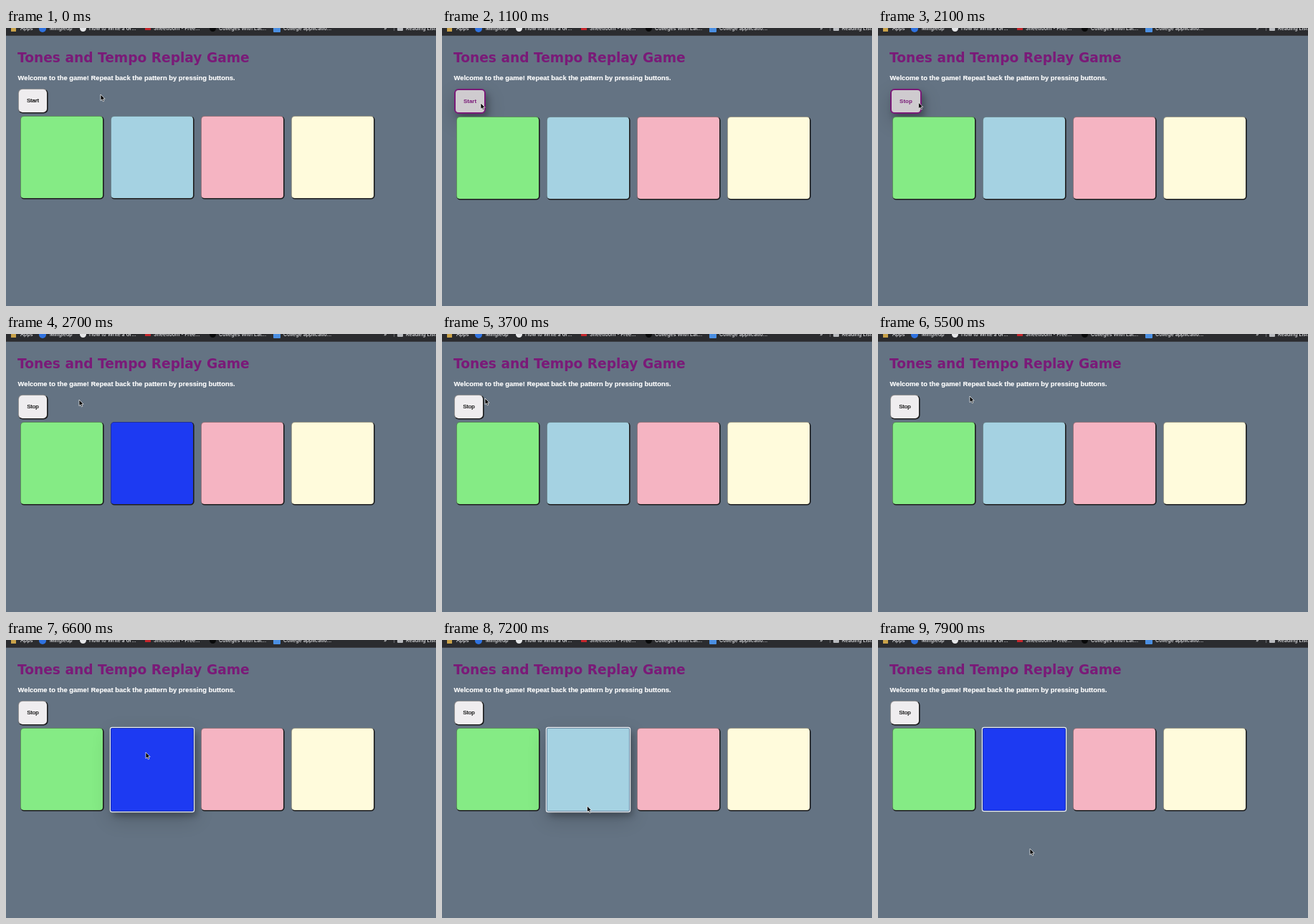
An HTML page that plays this animation: 600x389 px, repeating every 8000 ms.

```html
<!DOCTYPE html>
<html lang="en">
<head>
<meta charset="utf-8">
<title>Replay game</title>
<style>
  html, body { margin: 0; width: 100%; height: 100%; overflow: hidden; background: #647383; }
  #stage {
    --lift: 4px 6px 9px rgba(0,0,0,.26), 1px 10px 28px rgba(0,0,0,.19);
    --edge: .4px .4px 0 .2px #151515;
    position: relative; width: 600px; height: 389px; overflow: hidden; background: #647383;
  }
  #stage > *, .bar * { position: absolute; box-sizing: border-box; white-space: nowrap; }
  .bar { left: 0; top: 0; width: 600px; height: 11px; overflow: hidden; background: #2b2c2f; border-bottom: 1px solid #3a3d42; }
  .bar span { top: -4px; font: 500 7.1px/10px Inter, sans-serif; color: #e4e5e8; }
  h1 { left: 16px; top: 30px; margin: 0; font: bold 18.6px/24px "DejaVu Sans", Verdana, sans-serif; color: #7a1a78; }
  p {
    left: 16.5px; top: 63px; margin: 0; color: #fff;
    font: bold 9.39px/14px "Liberation Sans", Arial, sans-serif; -webkit-text-stroke: .15px #fff;
  }
  .toggle, .tile {
    border: 1px solid #222; border-top-color: rgba(40,40,40,.45); border-left-color: rgba(40,40,40,.45);
    box-shadow: var(--edge);
  }
  .toggle {
    left: 17px; top: 85px; width: 41px; height: 34px; border-radius: 6px;
    background: #efedef; color: #000;
    font: 8.1px/32px "Liberation Sans", Arial, sans-serif; text-align: center;
    -webkit-text-stroke: .2px currentColor;
  }
  .toggle.hover {
    width: 44px; height: 35px; border: 2px solid #7a1a78; background: #cfcbcf; color: #7a1a78;
    font-weight: bold; font-size: 8px; -webkit-text-stroke: 0; box-shadow: var(--lift);
  }
  .tile { width: 116px; height: 116px; border-radius: 5px; background: var(--dim); }
  .tile.hover { box-shadow: var(--edge), var(--lift); }
  .tile.lit { background: var(--bright); }
  .tile.focus { --edge: 0 0 0 1.2px #e9edf1; border-color: rgba(20,30,70,.4); border-radius: 2px; }
  .tile.focus.hover { height: 117px; }
</style>
</head>
<body>
<div id="stage">
  <div class="bar"></div>
  <h1>Tones and Tempo Replay Game</h1>
  <p>Welcome to the game! Repeat back the pattern by pressing buttons.</p>
  <div class="toggle">Start</div>
</div>
<script>
const stage = document.getElementById('stage');
const bar = stage.querySelector('.bar');
const toggle = stage.querySelector('.toggle');

function add(parent, tag, className, style, text = '') {
  const el = document.createElement(tag);
  el.className = className;
  el.textContent = text;
  Object.assign(el.style, style);
  parent.append(el);
  return el;
}

// Bookmarks: x, label
[[20, 'Apps'], [61, 'Mingleup'], [116, 'How to Write a Gr...'],
 [206, 'Sheetloom - Free...'], [297, 'Colleges With Eat...'],
 [387, 'College applicatio...'], [527, '»'], [558, 'Reading List']]
  .forEach(([x, label]) => add(bar, 'span', '', { left: x + 'px' }, label));

// Icons: x, top, size, colour, corner radius
[[7, -3, 7, '#c9a24a', 0], [46, -4, 10, '#2f72e0', 5], [103, -4, 9, '#e6e7e9', 5],
 [194, -5, 8, '#c4262c', 0], [284, -4, 9, '#08090a', 5], [373, -4, 10, '#4b8fe2', 1],
 [541, -4, 1, '#6a6c70', 0], [546, -4, 8, '#b9bbbf', 1]]
  .forEach(([x, y, size, color, r]) => add(bar, 'i', '', {
    left: x + 'px', top: y + 'px', width: size + 'px', height: Math.max(size, 8) + 'px',
    background: color, borderRadius: r + 'px'
  }));

const tiles = ['#85eb85', '#a5d2e2', '#f5b4c2', '#fffbdc'].map((color, i) => {
  const el = add(stage, 'div', 'tile', { left: 20 + i * 126 + 'px' });
  el.style.setProperty('--dim', color);
  return el;
});
const blue = tiles[1];
blue.style.setProperty('--bright', '#1d3af2');

const pointer = add(stage, 'div', '', { left: 0, top: 0, width: '9px', height: '13px' });
pointer.innerHTML = `<svg width="9" height="13" viewBox="-1 -1 9 13" style="display:block">
  <path d="M0 0V8.6L2 6.8L3.3 9.8L4.8 9.2L3.5 6.2H6.1Z" fill="#000" stroke="#fff" stroke-width=".7"/></svg>`;

const LOOP = 8000, STEP = 100;

// Pointer path: time, x, y
const path = [
  [0, 132, 93], [200, 130, 93], [900, 66, 101], [1000, 57, 104], [1100, 54, 105],
  [2000, 54, 105], [2700, 102, 92], [3000, 100, 92], [3700, 60, 90], [3900, 51, 95],
  [4200, 53, 96], [4500, 72, 92], [5500, 128, 87], [6100, 172, 140], [6500, 195, 157],
  [6900, 195, 158], [7300, 204, 246], [7700, 212, 292], [8000, 212, 292]
];

function pointerAt(t) {
  const i = path.findIndex(([time], k) => k > 0 && t < time);
  const [t0, x0, y0] = path[i - 1], [t1, x1, y1] = path[i];
  const u = (t - t0) / (t1 - t0), e = u * u * (3 - 2 * u);
  return [x0 + (x1 - x0) * e, y0 + (y1 - y0) * e];
}

const within = (v, from, to) => v >= from && v < to;

function draw(t) {
  const [x, y] = pointerAt(t);
  const overToggle = within(x, 17, 58) && within(y, 85, 119);
  const overBlue = within(x, 146, 262) && within(y, 123, 240);
  const clue = within(t, 2600, 3600) || t >= 7700;
  const pressed = within(t, 6500, 6700);

  pointer.style.transform = `translate(${x - 1}px, ${y - 1}px)`;
  toggle.textContent = t < 1600 ? 'Start' : 'Stop';
  toggle.classList.toggle('hover', overToggle);
  tiles.forEach(tile => { tile.style.top = (overToggle ? 124 : 123) + 'px'; });
  blue.classList.toggle('hover', overBlue);
  blue.classList.toggle('lit', clue || pressed);
  blue.classList.toggle('focus', t >= 6500);
}

const start = performance.now();
function tick() {
  const t = (performance.now() - start) % LOOP;
  draw(Math.floor(t / STEP) * STEP);
  requestAnimationFrame(tick);
}
draw(0);
requestAnimationFrame(tick);
</script>
</body>
</html>
```
